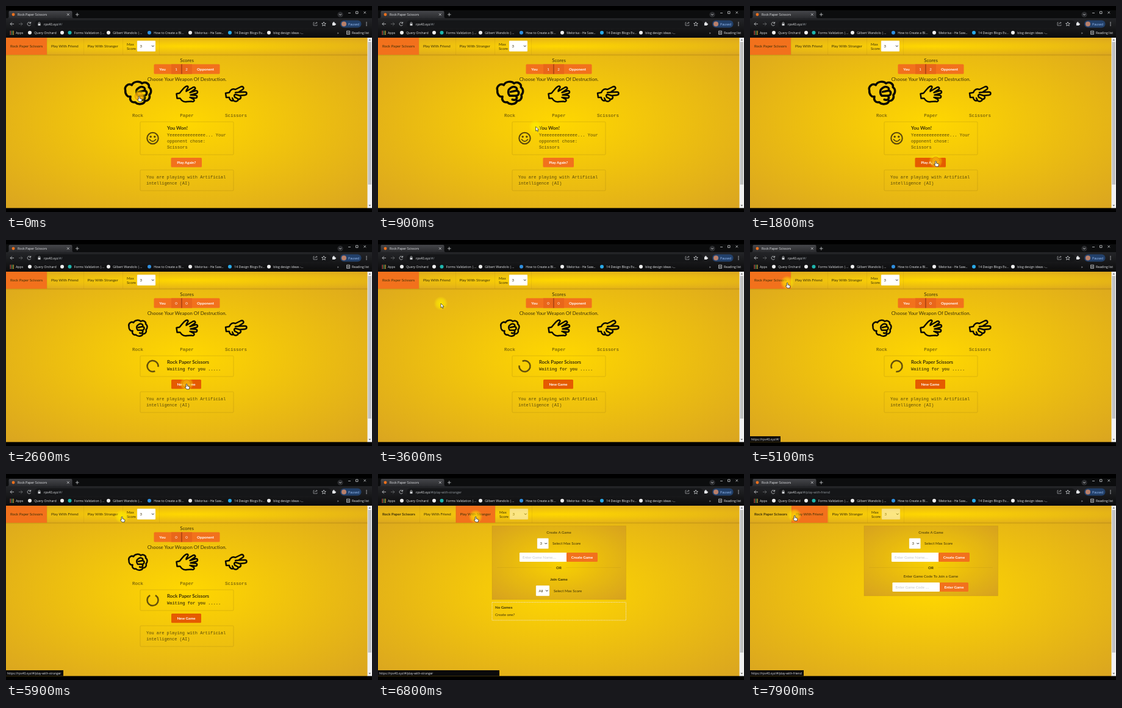
Recreate the animation shown at these times as an HTML page. Size 600 px wide and 338 px high, loop 8000 ms.

```html
<!DOCTYPE html>
<html lang="en">
<head>
<meta charset="utf-8">
<title>Rock Paper Scissors</title>
<style>
html, body { margin: 0; width: 100%; height: 100%; overflow: hidden; background: #000; }
svg { display: block; width: 100vw; height: 100vh; }
text { font: 6.15px Lato, sans-serif; fill: #3a2f08; dominant-baseline: alphabetic; white-space: pre; }
.ui { font: 5.25px "Open Sans", "Noto Sans", sans-serif; fill: #e8eaed; }
.mono { font: 7px "Liberation Mono", monospace; fill: #574709; }
.b { font-weight: 700; }
.w { fill: #fff; }
.mid { text-anchor: middle; }
.big { font-size: 7.85px; }
.hint { fill: #c6c6c6; }
.box { fill: none; stroke: #8d6c10; stroke-opacity: .42; stroke-width: .6; }
.hand { fill: none; stroke: #0c0a02; stroke-width: 2.5; stroke-linejoin: round; stroke-linecap: round; }
.line { fill: none; stroke: #cfd1d4; stroke-width: .8; }
</style>
</head>
<body>
<svg id="stage" viewBox="0 0 600 338" preserveAspectRatio="none" xmlns="http://www.w3.org/2000/svg"></svg>
<script>
const ORANGE = '#f2711c', PRESSED = '#e55b00';
const stage = document.getElementById('stage');

const text = (x, y, s, cls = '', id = '') =>
  `<text x="${x}" y="${y}" class="${cls}"${id && ` id="${id}"`}>${s}</text>`;
const rect = (x, y, w, h, fill, extra = '') =>
  `<rect x="${x}" y="${y}" width="${w}" height="${h}" fill="${fill}" ${extra}/>`;
const dot = (x, y, r, fill) => `<circle cx="${x}" cy="${y}" r="${r}" fill="${fill}"/>`;
const path = (d, cls = 'line', extra = '') => `<path d="${d}" class="${cls}" ${extra}/>`;
const box = (x, y, w, h) => `<rect x="${x}" y="${y}" width="${w}" height="${h}" rx="1.5" class="box"/>`;
const group = (id, body) => `<g id="${id}">${body}</g>`;
const button = (x, y, w, h, label, id = '') =>
  rect(x, y, w, h, ORANGE, `rx="1.5"${id && ` id="${id}"`}`) + text(x + w / 2, y + h / 2 + 2.2, label, 'b w mid');
const select = (x, y, w, h, value) =>
  rect(x, y, w, h, '#fff', 'rx="1" stroke="#e6dcae" stroke-width=".4"') +
  text(x + 4.5, y + h / 2 + 2.2, value) +
  path(`M${x + w - 6} ${y + h / 2 - 1} l1.8 1.9 1.8 -1.9`, '', 'fill="none" stroke="#222" stroke-width="1"');
const input = (x, y, w, hint) => rect(x, y, w, 15, '#fff', 'rx="1.2"') + text(x + 5, y + 9.7, hint, 'hint');

function browser() {
  const bookmarks = [
    [39, '#eee', 'Query Orchard'], [92, '#eee', ''], [104.5, '#1fb5ad', 'Forms Validation |...'],
    [168, '#eee', 'Gilbert Wandolo |...'], [235, '#2f8fe0', 'How to Create a Bl...'],
    [302, '#eee', 'Melorisa - He Saw...'], [367, '#2aa9e8', '14 Design Blogs Ev...'],
    [431, '#eee', 'blog design ideas -...']
  ];
  const appDots = [...Array(9).keys()].map(i =>
    rect(6.5 + i % 3 * 2.4, 40.8 + Math.floor(i / 3) * 2.4, 1.6, 1.6, ['#e8584a', '#4caf6a', '#e9b63c'][i % 3])).join('');
  return rect(0, 0, 600, 52, '#000') + rect(0, 7, 600, 13, '#0c0d0e') +
    rect(0, 20, 600, 32, 'url(#toolbar)') +
    path('M2 20 Q4.500 20 4.500 17 V10 Q4.500 8 6.500 8 H106.500 Q108.500 8 108.500 10 V17 Q108.500 20 111 20Z', '', 'fill="url(#tab)"') +
    dot(12, 14, 2.4, ORANGE) + text(19, 16, 'Rock Paper Scissors', 'ui') +
    path('M100 12.200 l3.600 3.600 m0 -3.600 l-3.600 3.600 M114 14 h5.600 m-2.800 -2.800 v5.600') +
    dot(548, 14, 4.6, '#2b2c2f') + path('M546 13 l2 2 2 -2 M561 11.500 h4 M573.500 9 h3.500 v3.500 h-3.500z M586.500 9 l3.500 3.500 m0 -3.500 l-3.500 3.500') +
    path('M13 29.500 H7 m2.800 -2.800 l-2.800 2.800 2.800 2.800') +
    path('M21 29.500 h6 m-2.800 -2.800 l2.800 2.800 -2.800 2.800', 'line', 'opacity=".45"') +
    path('M40.300 28 a2.800 2.800 0 1 0 .2 2.600 M40.600 26 v2.400 h-2.400') +
    rect(47, 23.5, 486, 12.5, '#151618', 'rx="6.2"') +
    rect(52.5, 29, 4, 3.2, '#cfd1d4') + path('M53.200 29 v-1 a1.300 1.300 0 0 1 2.600 0 v1') +
    `<text x="62" y="31.700" class="ui">rps40.xyz<tspan id="route" fill="#9aa0a6">/#/</tspan></text>` +
    path('M505.500 27 h-1.500 v5 h6 v-1.500 M506 30 q.5 -2.500 4 -2.500 m-1.500 -1.500 l1.500 1.500 -1.500 1.500', 'line', 'opacity=".75"') +
    path('M521 26.200 l1 2.200 2.400 .2 -1.800 1.600 .6 2.400 -2.200 -1.300 -2.200 1.300 .6 -2.400 -1.800 -1.600 2.400 -.2z') +
    rect(535, 27.5, 4.6, 4.6, '#e8eaed', 'rx=".6"') + dot(537.3, 27, 1.1, '#e8eaed') + dot(540, 29.8, 1.1, '#e8eaed') +
    rect(548, 23.5, 34.5, 12, '#22406a', 'rx="6"') + dot(554, 29.5, 4, '#b9806b') +
    `<text x="561" y="31.500" class="ui" style="fill:#9cc2fa">Paused</text>` +
    [27, 29.5, 32].map(y => dot(591, y, .75, '#dadce0')).join('') +
    appDots + text(16, 45.7, 'Apps', 'ui') +
    bookmarks.map(([x, c, s]) => dot(x, 43.8, 3, c) + text(x + 7.2, 45.7, s, 'ui')).join('') +
    text(543, 45.5, '»', 'ui') + path('M558.500 41 h5 v5.500 h-5z M559.500 43 h3 m-3 1.700 h3') +
    text(567, 45.7, 'Reading list', 'ui');
}

function nav() {
  const dividers = [67, 127, 191.3, 251.5].map(x => rect(x, 52, .5, 28, '#8b6b10', 'opacity=".22"')).join('');
  return rect(0, 80, 593, 2.5, 'url(#shade)') + rect(0, 52, 593, 28, 'url(#gold)') +
    rect(0, 79.6, 593, .5, '#8b6b10', 'opacity=".35"') +
    rect(0, 52, 67, 28, ORANGE, 'id="active"') +
    group('navText', dividers +
      text(74, 68.2, 'Play With Friend') + text(133.5, 68.2, 'Play With Stranger') +
      text(198, 65, 'Max') + text(198, 71.5, 'Score') +
      group('navSelect', select(215, 57, 30, 17.5, '3'))) +
    text(7, 68.2, 'Rock Paper Scissors', '', 'home');
}

const fist = 'M-14.500 -3 C-16 -8 -11 -12 -7 -9.500 C-5 -14 2 -14.500 5 -11.500 C9 -14 14 -11 13 -7 C16.500 -5 16 0 13.500 2 C15 6 12 9.500 8.500 9 C7 13.500 0 14 -3 10.500 C-7 11.500 -10 8 -8.500 4 C-12 5 -15 1 -14.500 -3Z' +
  'M1 -6 C4 -9 10 -7 8 -3 L1 -1.500 M8 -3 C12 -2 11 3 7 3 L0 3 M7 3 C10 6 7 9 3 7.500 M1 -6 C-3 -4 -2 1 0 3';
const palm = 'M-17 -1 L-12 -2 L-7 -8 C-4 -12 0 -15 2 -12.500 C3 -10 -2 -8 -1 -5 L10 -11.500 C13.500 -13 15 -9.500 12.500 -8 L5 -3 L14.500 -6 C18 -6.500 18.500 -2.500 15.500 -1.500 L6 1 L14.500 1.500 C18 2.500 17 6.500 13.500 6 L5 5 L11 8 C13.500 10 11 13 8 11.500 L0 12 C-6 13 -9 10 -11 6.500 L-16 6.500Z';
const shears = 'M-17 -2 L-11 -3 C-9 -8 -5 -10 -1 -8 L8 -12.500 C12 -14 14 -9.500 11 -8 L4 -3.500 L14.500 -4 C18.500 -4 18.500 1 14.500 1.200 L6 2 C9.500 4 8 8 4 8 C3 12 -2 12.500 -4 10 C-8 11.500 -11 8 -11 5 L-16 5Z' +
  'M6 2 L-1 0 C-4 1 -3 5 0 5.500 L4 8 M-4 10 L-6 6 M4 -3.500 L-1 -3';

function game() {
  const weapon = (x, d, name, id) => `<path id="${id}" d="${d}" class="hand" transform="translate(${x} 145)"/>` +
    `<text x="${x}" y="182" class="mono mid" style="font-size:7.500px">${name}</text>`;
  const won = box(220, 190, 153, 54) +
    '<g fill="none" stroke="#5a470c" stroke-width="2.100"><circle cx="240.500" cy="217" r="9.200"/><path d="M235.500 219 q5 6 10 0" stroke-linecap="round" stroke-width="1.800"/></g>' +
    dot(237.2, 214.5, 1.7, '#5a470c') + dot(243.8, 214.5, 1.7, '#5a470c') +
    text(264, 203, 'You Won!', 'b big') +
    ['Yeeeeeeeeeeeeee... Your', 'opponent chose:', 'Scissors'].map((s, i) => text(264, 214 + i * 10, s, 'mono')).join('') +
    button(270.5, 249, 50.5, 15.5, 'Play Again?', 'again');
  const waiting = box(220, 190, 153, 34) +
    '<circle id="spinner" cx="240.500" cy="207" r="9" fill="none" stroke="#54430c" stroke-width="2.500" stroke-opacity=".9" pathLength="100" stroke-dasharray="84 16" stroke-dashoffset="-8"/>' +
    text(264, 203, 'Rock Paper Scissors', 'b big') + text(264, 214, 'Waiting for you .....', 'mono b') +
    button(271, 229, 49, 15.3, 'New Game', 'fresh');
  return text(296.5, 92, 'Scores', 'big mid') +
    rect(242.5, 95.5, 108, 16, ORANGE, 'rx="1.5"') + rect(271, 95.5, 34, 16, '#e9661a') +
    rect(287.5, 95.5, .9, 16, '#7a2608') +
    text(256.5, 105.7, 'You', 'b w mid') + text(327, 105.7, 'Opponent', 'b w mid') +
    text(279, 105.7, '1', 'w mid', 'mine') + text(296, 105.7, '2', 'w mid', 'theirs') +
    text(296.5, 123, 'Choose Your Weapon Of Destruction.', 'big mid') +
    weapon(216, fist, 'Rock', 'rock') + weapon(296.5, palm, 'Paper', 'paper') + weapon(377, shears, 'Scissors', 'scissors') +
    group('won', won) + group('waiting', waiting) +
    group('opponent', box(220, 269, 153, 34) + text(230, 283, 'You are playing with Artificial', 'mono') + text(230, 293, 'intelligence (AI)', 'mono'));
}

const card = height => rect(187, 85, 219.5, height, 'url(#gold)', 'stroke="#a87c10" stroke-opacity=".35" stroke-width=".5"') +
  rect(187, 85, 219.5, height, '#8a6508', 'opacity=".05"') +
  text(296.5, 97.5, 'Create A Game', 'mid') + select(261, 105.5, 18.5, 17, '3') + text(286, 116.3, 'Select Max Score') +
  input(232, 129, 77.5, 'Enter Game Name....') + button(309, 129, 51, 15, 'Create Game') +
  [195, 308].map(x => rect(x, 153.3, 90, .5, '#8b6b10', 'opacity=".25"')).join('') +
  text(296.5, 155.7, 'OR', 'b mid');

const stranger = () => card(121) + text(296.5, 174.5, 'Join Game', 'b mid') +
  select(259, 183, 22, 17, 'All') + text(288, 193.7, 'Select Max Score') +
  rect(187, 210.5, 219.5, 29.5, 'none', 'stroke="#f1dfa0" stroke-width=".9" stroke-dasharray="2 .6"') +
  text(192, 221, 'No Games', 'b') + text(192, 233, 'Create one?');

const friend = () => card(115) + text(296.5, 169.5, 'Enter Game Code To Join a Game', 'mid') +
  input(233.5, 178, 77.5, 'Enter Game Code ....') + button(311, 178, 47, 15, 'Enter Game');

const fade = (id, from, to) =>
  `<linearGradient id="${id}" x2="0" y2="1"><stop stop-color="${from}"/><stop offset="1" stop-color="${to}"/></linearGradient>`;

stage.innerHTML = `<defs>
  <radialGradient id="gold" r=".7071"><stop stop-color="#ffd700"/><stop offset="1" stop-color="#daa520"/></radialGradient>
  <radialGradient id="halo"><stop stop-color="#fff000" stop-opacity=".75"/><stop offset=".6" stop-color="#ffee00" stop-opacity=".5"/><stop offset="1" stop-color="#ffee00" stop-opacity="0"/></radialGradient>
  ${fade('shade', '#6b500030', '#6b500000')}${fade('toolbar', '#242528', '#0b0b0c')}${fade('tab', '#45464a', '#2a2b2e')}
</defs>` +
  rect(0, 0, 600, 338, '#000') + rect(0, 52, 593, 279.5, 'url(#gold)') +
  group('game', game()) + group('stranger', stranger()) + group('friend', friend()) + nav() + browser() +
  rect(592.5, 52, 7.5, 279.5, '#f1f1f1') + rect(593.5, 59, 5.5, 234, '#c1c1c1') +
  path('M594.500 56.500 l1.800 -2 1.800 2z M594.500 326.500 l1.800 2 1.800 -2z', '', 'fill="#555"') +
  group('status', rect(0, 322, 50, 9.5, '#0a0a0b', 'id="statusBox"') + `<text id="statusText" x="2" y="328.700" class="ui" style="font-size:5px"></text>`) +
  group('cursor', '<circle id="glow" r="11.500" fill="url(#halo)"/><circle id="press" r="6.800" fill="#f0960f" fill-opacity=".55" stroke="#d97706" stroke-width=".7"/>' +
    path('M-.8 .6 q1 -1.200 1.900 0 v3 l3 .8 q1 .4 .8 1.500 l-.7 3 h-4 l-2.700 -3.400 q.2 -1.300 1.700 -.3z', '', 'id="pointer" fill="#fff" stroke="#111" stroke-width=".7"') +
    path('M0 0 v7.200 l1.700 -1.500 1.200 2.600 1.200 -.6 -1.200 -2.500 h2.300z', '', 'id="arrow" fill="#fff" stroke="#111" stroke-width=".6"'));

const el = {};
stage.querySelectorAll('[id]').forEach(n => el[n.id] = n);
const show = (id, on) => el[id].style.display = on ? '' : 'none';
const set = (id, attrs) => { for (const k in attrs) el[id].setAttribute(k, attrs[k]); };

// Cursor stops: time, x, y
const stops = [[0, 218, 148], [350, 218, 148], [1500, 304.5, 254.5], [2050, 304.5, 254.5], [2400, 296, 236], [2750, 296, 236],
  [3500, 103, 104], [3900, 103, 104], [4850, 61, 70], [5200, 61, 70], [5800, 190, 70], [6050, 190, 70],
  [6400, 160, 70], [6850, 160, 70], [7250, 73, 68], [8000, 73, 68]];
const clicks = [[0, 150], [1700, 1900], [2500, 2650], [6420, 6560], [7420, 7560]];
// Status bubble: start, path, width
const statuses = [[0, null, 0], [4650, '', 50], [5300, 'play-with-friend', 88], [5560, 'play-with-stranger', 94],
  [6550, 'play-with-stranger', 199], [7080, 'play-with-friend', 88]];

function cursorAt(t) {
  const i = Math.max(1, stops.findIndex(s => s[0] > t));
  const [a, b] = [stops[i - 1], stops[i]];
  const u = (t - a[0]) / (b[0] - a[0]), e = u * u * (3 - 2 * u);
  return [a[1] + (b[1] - a[1]) * e, a[2] + (b[2] - a[2]) * e];
}

function render(t) {
  const won = t < 1900;
  const page = t < 6550 ? 'game' : t < 7550 ? 'stranger' : 'friend';
  const home = page === 'game';
  ['game', 'stranger', 'friend'].forEach(p => show(p, p === page));
  show('won', won);
  show('waiting', !won);
  set('opponent', { transform: `translate(0 ${won ? 0 : -20})` });
  set('rock', { transform: `translate(216 ${won ? 143 : 145}) scale(${won ? 1.4 : 1})` });
  set('spinner', { transform: `rotate(${(t - 5900) * .18 - 90} 240.5 207)` });
  el.mine.textContent = t < 2600 ? 1 : 0;
  el.theirs.textContent = t < 2600 ? 2 : 0;

  const [left, width] = { game: [0, 67], stranger: [127.5, 64.5], friend: [68, 59.5] }[page];
  set('active', { x: left, width });
  set('navText', { transform: `translate(${home ? 0 : 1} 0)` });
  set('navSelect', { opacity: home ? 1 : .5 });
  el.home.style.fontWeight = home ? 400 : 700;
  el.route.textContent = '/#/' + (home ? '' : 'play-with-' + page);

  const [, route, bubble] = statuses.filter(s => s[0] <= t).pop();
  show('status', route !== null);
  set('statusBox', { width: bubble });
  el.statusText.textContent = 'https://rps40.xyz/#/' + (route || '');

  const [x, y] = cursorAt(t);
  const over = (x0, y0, x1, y1) => x > x0 && x < x1 && y > y0 && y < y1;
  const onButton = home && (won ? over(270, 249, 321, 265) : over(271, 229, 320, 245));
  const onWeapon = home && (over(194, 122, 239, 163) || over(278, 130, 315, 160));
  const hand = onButton || onWeapon || over(0, 52, 192, 80);
  set('again', { fill: onButton ? PRESSED : ORANGE });
  set('fresh', { fill: PRESSED });
  set('cursor', { transform: `translate(${x} ${y})` });
  show('pointer', hand);
  show('arrow', !hand);
  show('press', clicks.some(([a, b]) => t >= a && t < b));
}

const start = performance.now();
function tick() {
  render((performance.now() - start) % 8000);
  requestAnimationFrame(tick);
}
render(0);
requestAnimationFrame(tick);
</script>
</body>
</html>
```
